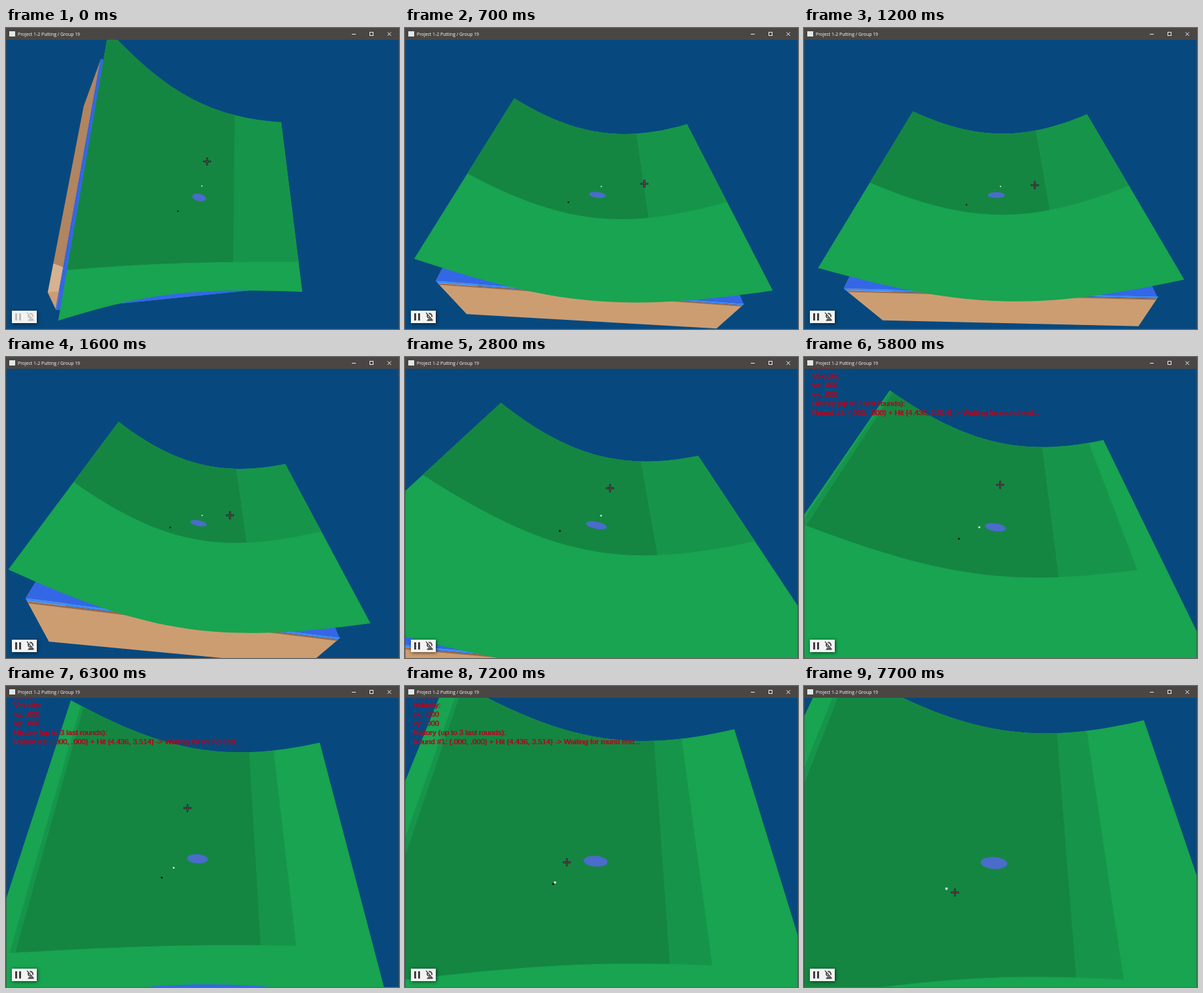
Recreate the animation shown at these times as an HTML page with a canvas. Size 600 px wide and 460 px high, loop 8000 ms.

```html
<!DOCTYPE html>
<html lang="en">
<head>
<meta charset="utf-8">
<title>Putting</title>
<style>
html, body { margin: 0; width: 600px; height: 460px; overflow: hidden; background: #07497e; }
canvas { display: block; }
</style>
</head>
<body>
<canvas id="stage" width="600" height="460"></canvas>
<script>
const ctx = document.getElementById('stage').getContext('2d');
const LOOP = 8000, STEP = 100, RAD = Math.PI / 180;
const FOCAL = 333, CX = 300, CY = 241;

// World units: x right, y away, z up, with the ball's first place at the origin
const LEFT = -5.48, RIGHT = 5.42, FAR = 5.05, RIM = 1.4;
const nearEdge = x => -5.1 - 0.025 * x;
const hole = [-1.53, -1.53, 0.3];
const pond = { x: -0.2, y: -0.65, rx: 0.41, ry: 0.19 };

// time, pitch, roll, distance, near end of the shade, right end of the shade
const views = [
  [100, 72.6, 35, 11.15, -3.75, 5.5],
  [700, 46.2, 9.1, 11.1, -1.5, 5.5],
  [1000, 46, -6, 11.1, -1.4, 5.5],
  [1600, 43.3, 14.9, 11.05, -1.1, 5.5],
  [2700, 43.2, 15.1, 8.9, -1.35, 5.5],
  [5500, 43.2, 15.1, 8.9, -1.35, 5.5],
  [6300, 68.3, 10.9, 8.85, -3.8, 3.5],
  [7700, 68.2, 10.9, 6.95, -3.85, 3.5]
];
const cursorPath = [[100, 307, 204], [700, 365.5, 238], [1600, 342, 242], [2700, 313, 200.5],
  [5500, 313, 200.5], [6300, 277, 186.5], [7700, 230.5, 315.5]];

const mix = (a, b, k) => a + (b - a) * k;
const clamp = (v, lo, hi) => Math.min(hi, Math.max(lo, v));

function along(keys, t) {
  let i = 1;
  while (i < keys.length - 1 && t > keys[i][0]) i++;
  const [a, b] = [keys[i - 1], keys[i]];
  const k = clamp((t - a[0]) / (b[0] - a[0]), 0, 1);
  return a.map((v, j) => mix(v, b[j], k)).slice(1);
}

// Returns a function from world point to [screen x, screen y, pixels per unit]
function makeCamera(pitch, roll, dist) {
  const sp = Math.sin(pitch * RAD), cp = Math.cos(pitch * RAD);
  const sr = Math.sin(roll * RAD), cr = Math.cos(roll * RAD);
  return ([x, y, z]) => {
    const rx = x * cr + z * sr, rz = z * cr - x * sr;
    const scale = FOCAL / (dist + y * cp - rz * sp);
    return [CX + rx * scale, CY - (y * sp + rz * cp) * scale, scale];
  };
}

// The green sags between its two straight sides, more so at the near end
function ground(x, y) {
  const u = (x - (LEFT + RIGHT) / 2) / ((RIGHT - LEFT) / 2);
  const sag = mix(1.49, 2.45, (FAR - y) / 10);
  return [x, y, RIM - sag * (1 - u * u)];
}

function poly(pts, fill) {
  ctx.beginPath();
  pts.forEach(p => ctx.lineTo(p[0], p[1]));
  ctx.closePath();
  ctx.fillStyle = fill;
  ctx.fill();
}

function line(x1, y1, x2, y2, width, color) {
  ctx.beginPath();
  ctx.moveTo(x1, y1);
  ctx.lineTo(x2, y2);
  ctx.lineWidth = width;
  ctx.strokeStyle = color;
  ctx.stroke();
}

function disc(x, y, r, fill) {
  ctx.beginPath();
  ctx.arc(x, y, r, 0, 7);
  ctx.fillStyle = fill;
  ctx.fill();
}

// Part of the green between two x values, from the far edge to near(x)
function patch(cam, left, right, near, fill) {
  const l = Math.max(left, LEFT), r = Math.min(right, RIGHT), n = 32;
  const back = [], front = [];
  for (let i = 0; i <= n; i++) {
    const x = mix(l, r, i / n);
    back.push(cam(ground(x, FAR)));
    front.unshift(cam(ground(x, near(x))));
  }
  poly([...back, ...front], fill);
}

function drawBase(cam, floor) {
  const wallL = z => -5.45 + 0.036 * z, wallR = z => 5.45 - 0.3 * z;
  const quad = (pts, fill) => poly(pts.map(cam), fill);
  const side = (top, low, y1, y2, fill) => quad([
    [wallL(top), y1, top], [wallL(top), y2, top], [wallL(low), y2, low], [wallL(low), y1, low]], fill);
  const front = (top, low, fill) => quad([
    [wallL(top), -5, top], [wallR(top), -5.2, top], [wallR(low), -5.2, low], [wallL(low), -5, low]], fill);
  side(-0.15, -4.3, FAR, floor, '#b18560');
  side(-0.15, -4.3, floor, -5, '#d6b28f');
  front(-0.36, -4.3, '#cd9d72');
  front(-0.36, -0.5, '#966b4b');
  side(-0.15, -0.34, FAR, -5, '#3467e6');
  front(-0.15, -0.34, '#3f8df6');
  quad([[-5.45, FAR, -0.15], [5.45, FAR, -0.15], [5.45, -5.2, -0.15], [-5.45, -5, -0.15]], '#3467e6');
}

function drawGreen(cam, floor, reach) {
  const left = -4.4 - 0.22 * reach;
  patch(cam, LEFT, RIGHT, nearEdge, '#18a450');
  patch(cam, left, reach, () => floor, '#16954a');
  patch(cam, left + 0.09, 2.35, () => floor, '#148642');
  const rim = [];
  for (let a = 0; a < 2 * Math.PI; a += 0.2) {
    rim.push(cam([pond.x + pond.rx * Math.cos(a), pond.y + pond.ry * Math.sin(a), 0]));
  }
  poly(rim, '#4a6ccb');
}

function drawBall(cam, t) {
  const roll = 1 - (1 - clamp((t - 4600) / 2900, 0, 1)) ** 1.5;
  const dot = (p, fill) => {
    const [x, y, scale] = cam(p);
    disc(x, y, scale * 0.035, fill);
  };
  dot(hole, '#0b1a10');
  dot([hole[0] * roll, hole[1] * roll, mix(-0.06, hole[2], roll)], '#f4eee6');
}

function drawCursor(x, y) {
  for (const [size, gap, width, color] of [[6, 1, 2.6, '#1a1620'], [5.2, 1.6, 1, '#a04a6a']]) {
    for (const s of [-1, 1]) {
      line(x + s * gap, y, x + s * size, y, width, color);
      line(x, y + s * gap, x, y + s * size, width, color);
    }
  }
}

function drawStatus() {
  const rows = ['z: .000', 'Velocity:', 'vx: .000', 'vy: .000', 'History (up to 3 last rounds):',
    'Round #1: {.000, .000} + Hit {4.436, 3.514} -> Waiting for round end...'];
  ctx.font = '11.3px "Liberation Sans", Arial, sans-serif';
  for (const [dx, color] of [[0.8, '#8c0a22'], [0, '#c4061f']]) {
    ctx.fillStyle = color;
    rows.forEach((row, i) => ctx.fillText(row, 12 + dx, 19 + i * 14));
  }
}

function drawWindow() {
  ctx.fillStyle = '#4a4644';
  ctx.fillRect(0, 0, 600, 18);
  ctx.fillStyle = '#dfe9e6';
  ctx.fillRect(5, 5, 9, 8);
  ctx.fillStyle = '#fff';
  ctx.font = '6.9px "Open Sans", sans-serif';
  ctx.fillText('Project 1-2 Putting / Group 19', 18, 12);
  line(528, 9.5, 534, 9.5, 1, '#eee');
  ctx.strokeRect(555.5, 6.5, 5, 5);
  line(582.5, 6.5, 588, 12, 1, '#eee');
  line(588, 6.5, 582.5, 12, 1, '#eee');
  ctx.strokeStyle = 'rgba(74, 70, 68, .6)';
  ctx.strokeRect(0.5, 0.5, 599, 460);
}

function drawToolbar(t) {
  const ink = t < 100 ? '#bdbdbd' : '#3d3d3d';
  ctx.save();
  ctx.shadowColor = 'rgba(0,0,0,.65)';
  ctx.shadowBlur = 5;
  ctx.shadowOffsetX = ctx.shadowOffsetY = 1;
  ctx.fillStyle = '#f3f3f3';
  ctx.fillRect(9, 432, 38, 19);
  ctx.restore();
  ctx.fillStyle = ink;
  ctx.fillRect(14, 436, 3, 11);
  ctx.fillRect(20, 436, 3, 11);
  disc(37.5, 440, 4.4, ink);
  disc(37.5, 440, 2.6, '#f3f3f3');
  disc(37.5, 440, 1.3, ink);
  poly([[33, 447.5], [35, 445], [40, 445], [42, 447.5]], ink);
  line(33, 434.5, 43, 446, 2.2, '#f3f3f3');
  line(32, 435, 42.5, 447, 1.2, ink);
}

function draw(t) {
  const [pitch, roll, dist, floor, reach] = along(views, t);
  const cam = makeCamera(pitch, roll, dist);
  ctx.fillStyle = '#07497e';
  ctx.fillRect(0, 0, 600, 460);
  drawBase(cam, floor);
  drawGreen(cam, floor, reach);
  drawBall(cam, t);
  if (t >= 4700 && t < 7400) drawStatus();
  drawCursor(...along(cursorPath, t));
  drawWindow();
  drawToolbar(t);
}

const start = performance.now();
function tick() {
  const t = (performance.now() - start) % LOOP;
  draw(Math.floor(t / STEP) * STEP);
  requestAnimationFrame(tick);
}
tick();
</script>
</body>
</html>
```
